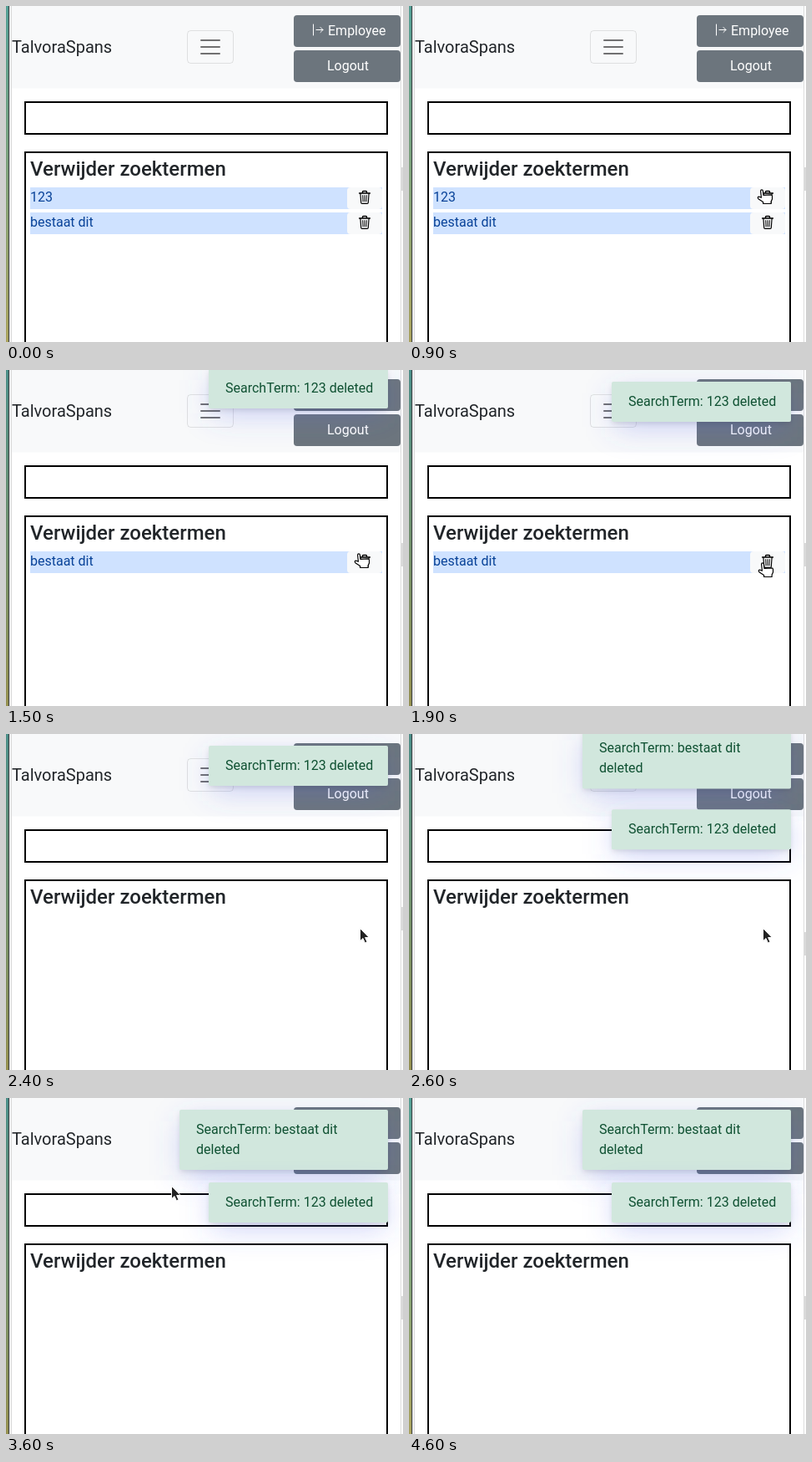
Animation of 476 by 402 pixels, one loop 4700 ms. Source, as an HTML page:

```html
<!DOCTYPE html>
<html lang="nl">
<head>
<meta charset="utf-8">
<title>Zoektermen</title>
<style>
  html, body { margin: 0; width: 100%; height: 100%; overflow: hidden; background: #fff; }
  svg { display: block; width: 476px; height: 402px; font: 16px Roboto, "Noto Sans", sans-serif; }
  .brand { font-size: 20px; fill: #212529; }
  .title { font-size: 24px; font-weight: 500; fill: #212529; }
  .btn rect { fill: #6c757d; }
  .btn text { fill: #fff; }
  .box { fill: #fff; stroke: #000; stroke-width: 2; }
  .row text { fill: #084298; }
  .toast text { fill: #0f5132; }
  .line { fill: none; stroke-linecap: round; stroke-linejoin: round; }
</style>
</head>
<body>
<svg viewBox="0 0 476 402">
  <defs>
    <linearGradient id="strip" x1="0" y1="0" x2="0" y2="1">
      <stop id="stripTop"/>
      <stop id="stripEnd" offset="1"/>
    </linearGradient>
    <filter id="glow" x="-60%" y="-150%" width="220%" height="400%"><feGaussianBlur stdDeviation="18"/></filter>
    <filter id="soft" x="-20%" y="-40%" width="140%" height="180%"><feGaussianBlur stdDeviation="3"/></filter>
    <g id="trash" class="line" stroke="#000">
      <path d="M1.6 2.9H14.4M5.5 2.6V1.6Q5.5.6 6.5.6H9.5Q10.5.6 10.5 1.6V2.6" stroke-width="1.5"/>
      <path d="M2.9 3.2L3.7 14.3Q3.8 15.4 4.8 15.4H11.2Q12.2 15.4 12.3 14.3L13.1 3.2" stroke-width="1.2"/>
      <path d="M5.7 5.6L6 12.8M8 5.6V12.8M10.3 5.6L10 12.8"/>
    </g>
  </defs>

  <rect width="476" height="402" fill="#fff"/>
  <rect width="3" height="402" fill="url(#strip)"/>
  <rect x="3" width="1" height="402" fill="#3c4043"/>
  <rect x="4" width="2" height="402" fill="#eeeeef"/>
  <rect x="6" width="467" height="98.5" fill="#f8f9fa"/>
  <rect x="6" width="1" height="402" fill="#dcdcdc"/>
  <rect x="473" width="1" height="402" fill="#dcdcdc"/>
  <rect id="marker" x="474" width="2" height="28" fill="#d9d9d9"/>

  <text class="brand" x="7" y="56">TalvoraSpans</text>
  <rect x="217.5" y="29.5" width="55" height="39" rx="4" fill="none" stroke="#000" stroke-opacity=".1"/>
  <path class="line" d="M234 41h22M234 49h22M234 57h22" stroke="#000" stroke-opacity=".55" stroke-width="2"/>
  <g class="btn">
    <rect x="345" y="11" width="128" height="38" rx="4"/>
    <rect x="345" y="53" width="128" height="38" rx="4"/>
    <path class="line" d="M368.5 22V35M372 28.5H380M377 25.5L380 28.5L377 31.5" stroke="#fff"/>
    <text x="386" y="35">Employee</text>
    <text x="385" y="77">Logout</text>
  </g>

  <rect class="box" x="23" y="115" width="434" height="38"/>
  <rect class="box" x="23" y="175" width="434" height="260"/>
  <text class="title" x="29" y="203">Verwijder zoektermen</text>
  <g id="rows"></g>
  <g id="toasts"></g>

  <path id="arrow" d="M.5.5V15.7L4 12.5L6.4 17.9L9 16.7L6.6 11.5H11.3Z" fill="#222" stroke="#fff"/>
  <path id="hand" d="M-1.4 1.2C-1.4-.6 1.2-.6 1.4 1.2L2 6.4L10.6 5.8Q12.5 5.8 12.5 7.6V11L11.1 14V16.5H1.6V14.5L-3.8 11C-5.6 9.4-4.6 7.6-2.8 8.2L-.6 9.2Z" fill="#fff" stroke="#000" stroke-width="1.2" stroke-linejoin="round"/>
</svg>
<script>
const LOOP = 4700, STEP = 100, SLIDE = 400;
const $ = id => document.getElementById(id);
const easeOut = p => 1 - (1 - Math.min(1, Math.max(0, p))) ** 3;
const slide = (t, start) => easeOut((t - start) / SLIDE);
const place = (el, x, y) => el.setAttribute('transform', `translate(${x} ${y})`);
const show = (el, on) => el.setAttribute('visibility', on ? 'visible' : 'hidden');

function addGroup(parent, type, markup) {
  const g = document.createElementNS('http://www.w3.org/2000/svg', 'g');
  g.setAttribute('class', type);
  g.innerHTML = markup;
  $(parent).append(g);
  return g;
}

const addRow = label => addGroup('rows', 'row', `
  <rect width="422" height="26" fill="#cfe2ff"/>
  <rect x="380" width="42" height="26" rx="4" fill="#f8f9fa"/>
  <text y="17">${label}</text>
  <use href="#trash" x="393" y="4"/>`);

function addToast(width, lines) {
  const height = 24 + 24 * lines.length;
  return addGroup('toasts', 'toast', `
    <rect x="4" y="14" width="${width - 8}" height="${height - 8}" fill="#4d60e8" fill-opacity=".3" filter="url(#glow)"/>
    <rect x="1" y="4" width="${width - 2}" height="${height - 2}" fill-opacity=".12" filter="url(#soft)"/>
    <rect width="${width}" height="${height}" rx="2" fill="#d1e7dd"/>
    ${lines.map((s, i) => `<text x="20" y="${29 + 24 * i}">${s}</text>`).join('')}`);
}

const rowA = addRow('123'), rowB = addRow('bestaat dit');
const toastB = addToast(250, ['SearchTerm: bestaat dit', 'deleted']);
const toastA = addToast(215, ['SearchTerm: 123 deleted']);

const REMOVE_A = 1200, REMOVE_B = 2300, TOAST_A = 1284, TOAST_B = 2400;

// Pointer path: time, x, y
const path = [
  [500, 347, 319], [600, 367, 292], [700, 392, 262], [800, 414, 235], [900, 423, 220],
  [1700, 423, 220], [1900, 424, 231], [2300, 424, 232], [2800, 424, 232], [2900, 425, 234],
  [3200, 425, 234], [3300, 425, 236], [3400, 375, 219], [3500, 283, 165], [3600, 198, 105],
  [3700, 151, 66], [3800, 126, 41], [3900, 111, 21], [4000, 96, 3], [4100, 90, -20]
];

function pointerAt(t) {
  const i = path.findIndex(p => p[0] > t);
  if (i < 1) return null;
  const [t0, x0, y0] = path[i - 1], [t1, x1, y1] = path[i];
  const k = (t - t0) / (t1 - t0);
  return [x0 + (x1 - x0) * k, y0 + (y1 - y0) * k];
}

function drawPointer(t) {
  const p = pointerAt(t);
  show($('arrow'), false);
  show($('hand'), false);
  if (!p) return;
  const [x, y] = p;
  const onTrash = t < REMOVE_B && x > 409 && y > 217 && y < 243;
  const onBrand = x > 7 && x < 129 && y > 33 && y < 66;
  const el = $(onTrash || onBrand ? 'hand' : 'arrow');
  show(el, true);
  place(el, x, y);
}

function draw(t) {
  const dim = t >= 1300 && t < 4600;
  $('stripTop').setAttribute('stop-color', dim ? '#4a8e88' : '#529f95');
  $('stripEnd').setAttribute('stop-color', dim ? '#95904f' : '#aaa25c');
  $('marker').setAttribute('y', t < 1300 ? 193 : t < 2500 ? 207 : 237);

  show(rowA, t < REMOVE_A);
  show(rowB, t < REMOVE_B);
  place(rowA, 29, 217);
  place(rowB, 29, t < REMOVE_A ? 247 : 217);

  const a = slide(t, TOAST_A), b = slide(t, TOAST_B);
  place(toastA, 243, -151 + 165 * a + 87 * b);
  place(toastB, 208, -151 + 165 * b);
  show(toastA, a > 0);
  show(toastB, b > 0);

  drawPointer(t);
}

const start = performance.now();
function tick() {
  const t = (performance.now() - start) % LOOP;
  draw(Math.floor(t / STEP) * STEP);
  requestAnimationFrame(tick);
}
tick();
</script>
</body>
</html>
```
